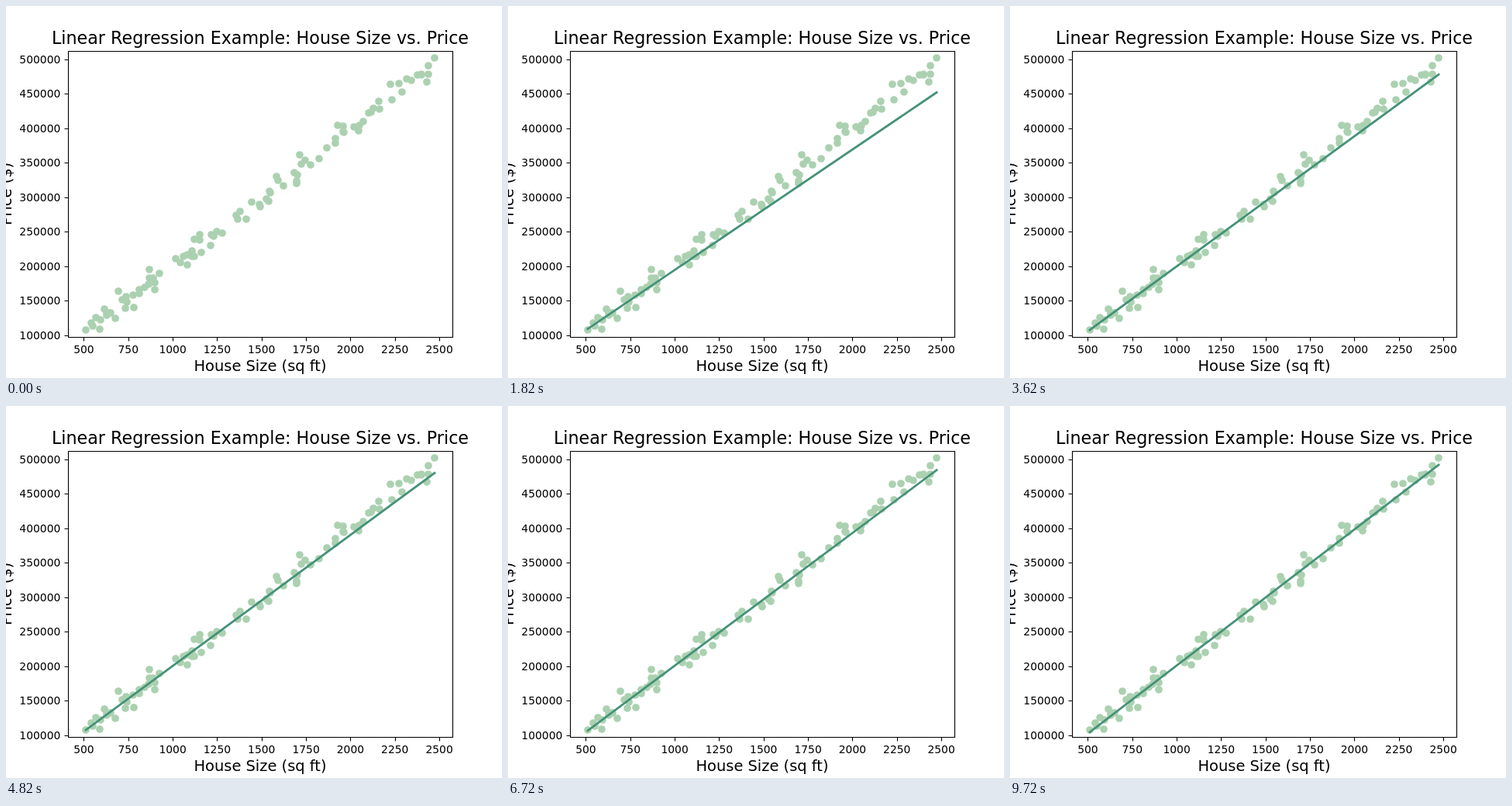
Recreate the animation shown at these times as an HTML page. Size 640 by 480 pixels, loop 9820 ms.

```html
<!DOCTYPE html>
<html lang="en">
<head>
<meta charset="utf-8">
<title>Linear Regression Example</title>
<style>
  html, body { margin: 0; width: 100%; height: 100%; overflow: hidden; background: #fff; }
  svg { display: block; width: 640px; height: 480px; font-family: "DejaVu Sans", sans-serif; }
</style>
</head>
<body>
<svg id="chart" viewBox="0 0 640 480"></svg>
<script>
// Mersenne Twister; one block of 624 words covers every draw made here.
function makeRandom(seed) {
  const N = 624, state = new Uint32Array(N);
  state[0] = seed;
  for (let i = 1; i < N; i++) {
    const prev = state[i - 1];
    state[i] = Math.imul(1812433253, prev ^ (prev >>> 30)) + i;
  }
  for (let i = 0; i < N; i++) {
    const y = (state[i] & 0x80000000) | (state[(i + 1) % N] & 0x7fffffff);
    state[i] = state[(i + 397) % N] ^ (y >>> 1) ^ (y & 1 ? 0x9908b0df : 0);
  }
  let next = 0;
  const word = () => {
    let y = state[next++];
    y ^= y >>> 11;
    y ^= (y << 7) & 0x9d2c5680;
    y ^= (y << 15) & 0xefc60000;
    return (y ^ (y >>> 18)) >>> 0;
  };
  return () => ((word() >>> 5) * 67108864 + (word() >>> 6)) / 9007199254740992;
}

// Polar method; returns two normally distributed numbers.
function gaussianPair(random) {
  let a, b, r;
  do {
    a = 2 * random() - 1;
    b = 2 * random() - 1;
    r = a * a + b * b;
  } while (r >= 1 || r === 0);
  const f = Math.sqrt(-2 * Math.log(r) / r);
  return [f * b, f * a];
}

const COUNT = 100;
const random = makeRandom(42);
const sizes = Array.from({ length: COUNT }, () => 500 + 2000 * random());
const noise = Array.from({ length: COUNT / 2 }, () => gaussianPair(random)).flat();
const houses = sizes
  .map((x, i) => ({ x, y: 200 * x + 10000 * noise[i] }))
  .sort((a, b) => a.x - b.x);

const prices = houses.map(h => h.y);
const firstX = houses[0].x, lastX = houses[COUNT - 1].x;
const minX = firstX - 100, maxX = lastX + 100;
const minY = Math.min(...prices) - 10000, maxY = Math.max(...prices) + 10000;
const px = x => 80 + 496 * (x - minX) / (maxX - minX);
const py = y => 427.2 - 369.6 * (y - minY) / (maxY - minY);

const text = (x, y, size, content, extra = 'text-anchor="middle"') =>
  `<text x="${x}" y="${y}" font-size="${size}" ${extra}>${content}</text>`;

const dots = houses.map(h =>
  `<circle cx="${Math.round(px(h.x))}" cy="${Math.round(py(h.y))}" r="4.86"/>`).join('');

let ticks = '', labels = '';
for (let v = 500; v <= 2500; v += 250) {
  ticks += `M${Math.round(px(v)) + 0.5} 427.5v5`;
  labels += text(px(v), 448, 13.889, v);
}
for (let v = 100000; v <= 500000; v += 50000) {
  ticks += `M80.5 ${Math.round(py(v)) + 0.5}h-5`;
  labels += text(70.3, Math.round(py(v) + 5), 13.889, v, 'text-anchor="end"');
}

document.getElementById('chart').innerHTML = `
  <clipPath id="plot"><rect x="80" y="58" width="496" height="369"/></clipPath>
  <g fill="#abd1b1">${dots}</g>
  <g clip-path="url(#plot)">
    <line id="fit" stroke="#449278" stroke-width="2.78" stroke-linecap="square"/>
  </g>
  <path d="M80.5 58.5H576.5V427.5H80.5Z${ticks}" fill="none" stroke="#000" stroke-width="1.11"/>
  ${labels}
  ${text(328, 49, 22.222, 'Linear Regression Example: House Size vs. Price')}
  ${text(328, 471, 19.444, 'House Size (sq ft)')}
  ${text(0, 0, 19.444, 'Price ($)', 'text-anchor="middle" transform="translate(7 242.4) rotate(-90)"')}`;

// Least squares line through the k smallest houses.
function fitLine(k) {
  const used = houses.slice(0, k);
  const meanX = used.reduce((s, h) => s + h.x, 0) / k;
  const meanY = used.reduce((s, h) => s + h.y, 0) / k;
  let sxx = 0, sxy = 0;
  for (const h of used) {
    sxx += (h.x - meanX) ** 2;
    sxy += (h.x - meanX) * (h.y - meanY);
  }
  return x => meanY + sxy / sxx * (x - meanX);
}

const LOOP = 9820, LEAD = 20, STEP = 100;
const line = document.getElementById('fit');
const start = performance.now();

function draw() {
  const t = Math.max(0, performance.now() - start) % LOOP;
  line.style.display = t < LEAD ? 'none' : '';
  if (t >= LEAD) {
    const predict = fitLine(2 + Math.floor((t - LEAD) / STEP));
    line.setAttribute('x1', px(firstX));
    line.setAttribute('y1', py(predict(firstX)));
    line.setAttribute('x2', px(lastX));
    line.setAttribute('y2', py(predict(lastX)));
  }
  requestAnimationFrame(draw);
}
draw();
</script>
</body>
</html>
```
